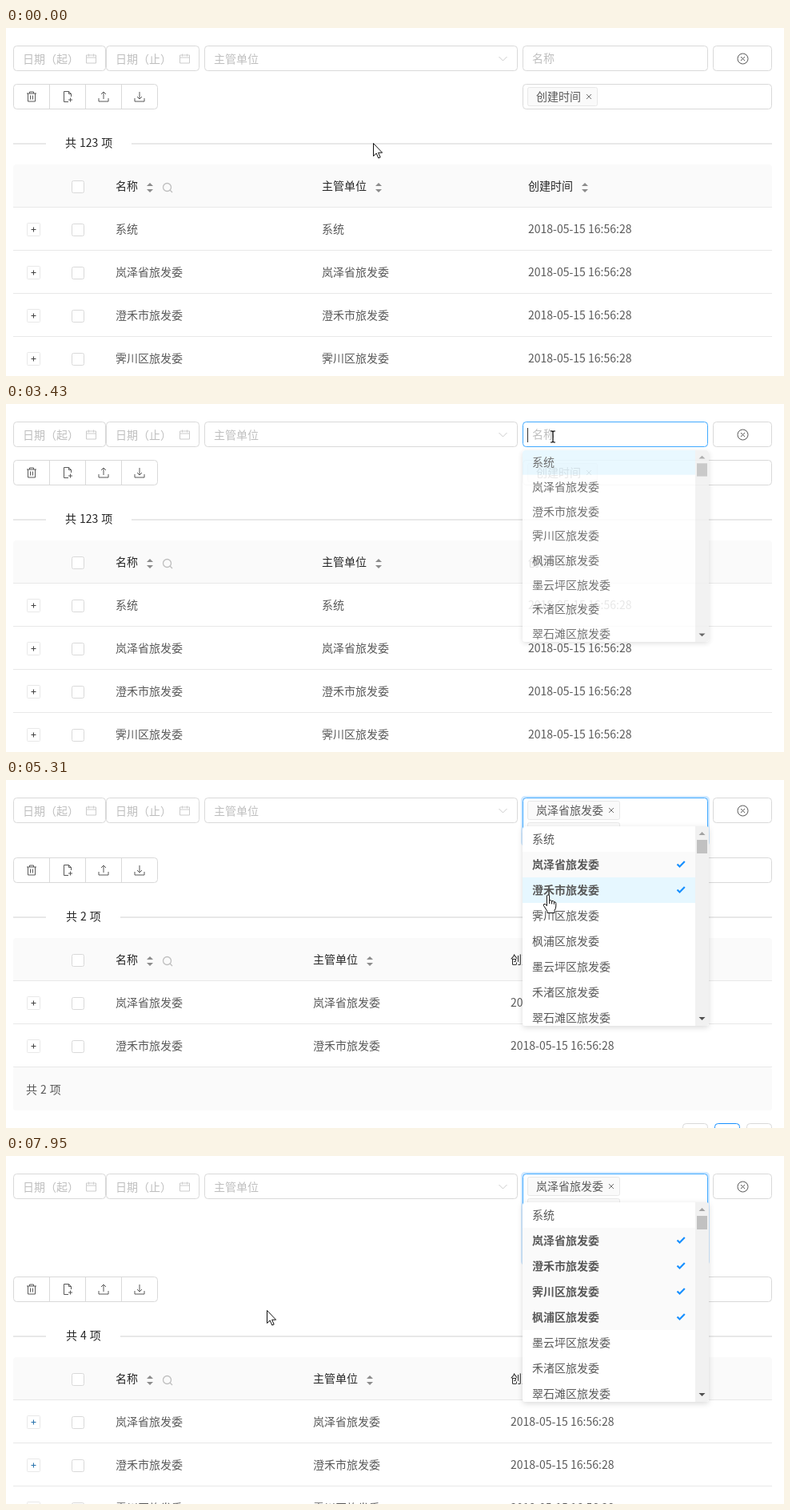
These frames come from a looping animation (973 px wide and 436 px high, 8 s). An HTML page:

```html
<!DOCTYPE html>
<html lang="zh-CN">
<head>
<meta charset="utf-8">
<style>
html, body { margin: 0; width: 100%; height: 100%; overflow: hidden; background: #fff; }
svg { display: block; font: 14px "Noto Sans CJK SC", "Noto Sans CJK", sans-serif; }
text { white-space: pre; }
</style>
</head>
<body>
<svg id="stage" width="973" height="436" viewBox="0 0 973 436"></svg>
<script>
const LOOP = 8000;
const TICK = 110.3; // ms per screen refresh; all times below count ticks
const INK = '#595959', DARK = '#262626', HINT = '#bfbfbf', LINE = '#d9d9d9', RULE = '#e8e8e8',
      PALE = '#fafafa', BLUE = '#1890ff', FOCUS = '#40a9ff', HOVER = '#e6f7ff';
const UNITS = ['系统', '岚泽省旅发委', '澄禾市旅发委', '霁川区旅发委', '枫浦区旅发委',
               '墨云坪区旅发委', '禾渚区旅发委', '翠石滩区旅发委'];
const DATE = '2018-05-15 16:56:28';

const ENTER = 27, TYPE = 29, OPEN = 31, LEAVE = 64;
const PICKS = [39, 46, 53, 61];
const ROW = 54, OPTION = 32, TAG = 27;
const PANEL = { x: 646, y: 58, w: 233, h: 250 };

const MOVES = [
  { from: 3, to: 11, d: 'M459 144C300 132 90 98 20 134' },
  { from: 11, to: 16, d: 'M20 134C8 196 120 200 151 167' },
  { from: 16, to: 19, d: 'M151 167C156 150 140 122 98 119' },
  { from: 19, to: 27, d: 'M98 119C340 110 560 80 684 41' },
  { from: 31, to: 36, d: 'M684 41L677 104' },
  { from: 40, to: 43, d: 'M677 104V135' },
  { from: 47, to: 52, d: 'M677 135L682 180' },
  { from: 54, to: 58, d: 'M682 180L683 200' },
  { from: 63, to: 71, d: 'M683 200C620 200 480 190 392 193' },
  { from: 71, to: 72, d: 'M392 193H326' }
];

const ICON = {
  calendar: 'M-6-4.5H6V5.5H-6ZM-6-1.5H6M-3-6V-3M3-6V-3',
  chevron: 'M-5-2.5L0 2.5L5-2.5',
  trash: 'M-6-4H6M-2.5-4V-6H2.5V-4M-4.5-4V6H4.5V-4M-1.5-1.5V3.5M1.5-1.5V3.5',
  file: 'M1 6.5H-4.5V-6.5H1.5L4.5-3.5V0M1.5-6.5V-3.5H4.5M1 4H6M3.5 1.5V6.5',
  upload: 'M-6 2V6H6V2M0 3V-6M-3-3L0-6L3-3',
  download: 'M-6 2V6H6V2M0-6V3M-3 0L0 3L3 0',
  clear: 'M-6.5 0a6.5 6.5 0 1 0 13 0a6.5 6.5 0 1 0-13 0M-2.5-2.5L2.5 2.5M2.5-2.5L-2.5 2.5',
  search: 'M-5.5-.5a5 5 0 1 0 10 0a5 5 0 1 0-10 0M3 3L6 6',
  cross: 'M-3-3L3 3M3-3L-3 3',
  plus: 'M-3 0H3M0-3V3',
  check: 'M-4.5 .3L-1.5 3.3L4.8-3.3',
  prev: 'M2.5-4.5L-2 0L2.5 4.5',
  next: 'M-2.5-4.5L2 0L-2.5 4.5'
};

const POINTERS = {
  arrow: '<path d="M.5.5V16.5L4.2 13L6.8 19L9.2 18L6.6 12.2H11.6Z" fill="#fff" stroke="#111"/>',
  beam: '<path d="M-3-7H-1L0-6L1-7H3M0-6V6M-3 7H-1L0 6L1 7H3" fill="none" stroke="#000" stroke-width="1.2"/>',
  hand: '<path d="M-1.6.8Q0-1.2 1.6.8V7Q3.3 6 4.6 7.6Q6.4 6.8 7.4 8.6Q9.6 8.4 9.8 10.6V14Q9.8 17 8 19.5V22.5H-1V20.5L-5.6 13.4Q-6 10.8-3.6 11.4L-1.6 13.6Z' +
    'M1.6 7V11M4.6 7.6V11.4M7.4 8.6V11.8" fill="#fff" stroke="#111" stroke-linejoin="round"/>'
};

const rect = (x, y, w, h, fill, r = 0) =>
  `<rect x="${x}" y="${y}" width="${w}" height="${h}" rx="${r}" fill="${fill}"/>`;
const box = (x, y, w, h, stroke = LINE, r = 4, fill = '#fff') =>
  `<rect x="${x + .5}" y="${y + .5}" width="${w - 1}" height="${h - 1}" rx="${r}" fill="${fill}" stroke="${stroke}"/>`;
const text = (s, x, y, fill = INK, attrs = '') => `<text x="${x}" y="${y}" fill="${fill}" ${attrs}>${s}</text>`;
const icon = (name, x, y, color = INK, width = 1) =>
  `<path d="${ICON[name]}" transform="translate(${x} ${y})" fill="none" stroke="${color}" stroke-width="${width}"/>`;
const shape = (d, fill) => `<path d="${d}" fill="${fill}"/>`;
const shift = (y, body) => `<g transform="translate(0 ${y})">${body}</g>`;

const field = (x, w, label, glyph) =>
  box(x, 22, w, 32) + text(label, x + 12, 44, HINT) + icon(glyph, x + w - 18.5, 38.5, '#ccc');
const tag = (label, x, y, w) =>
  box(x, y, w, 24, RULE, 2, PALE) + text(label, x + 11, y + 17) + icon('cross', x + w - 11, y + 12, '#737373');
const checkbox = y => box(82, y, 16, 16, LINE, 2);
const sorter = (x, y) => shape(`M${x - 4} ${y - 2}l4-4l4 4zM${x - 4} ${y + 2}l4 4l4-4z`, '#8c8c8c');

function title() {
  return shape('M17-32h7l12-5v18l-12-5h-1l1 5h-4l-2-5h-1zM37-31q3 0 3 3t-3 3z', '#111') +
    text('旅发委管理', 58, -21, INK, 'font-size="18"');
}

function filters(t, n, extra) {
  let out = field(9, 116, '日期（起）', 'calendar') + field(125, 117, '日期（止）', 'calendar') +
    field(248, 392, '主管单位', 'chevron') + box(884, 22, 74, 32) + icon('clear', 921.5, 38.5);
  if (t > OPEN) out += rect(644, 20, 236, 36 + extra, '#d1e9ff', 5);
  out += box(646, 22, 232, 32 + extra, t >= ENTER ? FOCUS : LINE);
  if (!n) out += text('名称', 658, 43, HINT);
  if (!n && t >= TYPE) out += rect(652, 30, 1, 18, '#333');
  for (let i = 0; i < n; i++) out += tag(UNITS[i + 1], 652, 26 + TAG * i, 116);
  return out;
}

function toolbar() {
  let out = box(9, 70, 181, 32);
  ['trash', 'file', 'upload', 'download'].forEach((name, i) => {
    if (i) out += rect(9 + 45 * i, 70, 1, 32, LINE);
    out += icon(name, 32 + 45 * i, 86);
  });
  return out + box(646, 70, 312, 32) + tag('创建时间', 652, 74, 88);
}

function pager(y) {
  const glyph = [icon('prev', 862, y + 16, HINT), text('1', 902, y + 21, BLUE, 'text-anchor="middle"'),
                 icon('next', 942, y + 16, HINT)];
  return glyph.map((g, i) => box(846 + 40 * i, y, 32, 32, i === 1 ? BLUE : LINE) + g).join('');
}

function table(t, n) {
  const col = i => 137 + (n ? 247 : 258) * i;
  const total = `共 ${n || 123} 项`;
  const plus = n === 1 || t >= LEAVE ? '#2a74ad' : '#444';
  const gapEnd = n ? 143 : 157;
  let out = rect(9, 144, 41, 2, RULE) + rect(gapEnd, 144, 958 - gapEnd, 2, RULE) +
    text(total, n ? 75 : 74, 149, DARK, 'word-spacing=".8"') +
    shape('M9 224V175q0-4 4-4H954q4 0 4 4V224z', PALE) + rect(9, 224, 949, 1, RULE) + checkbox(191);
  ['名称', '主管单位', '创建时间'].forEach((s, i) => {
    out += text(s, col(i), 203, DARK) + sorter(col(i) + 14 * s.length + 15, 200);
  });
  out += icon('search', 202, 200, HINT, 1.3);

  const rows = n || 4;
  for (let i = 0; i < rows; i++) {
    const y = 225 + ROW * i, name = UNITS[n ? i + 1 : i];
    out += box(26, y + 19, 17, 17, RULE, 1) + icon('plus', 34.5, y + 27.5, plus) +
      checkbox(y + 20) + rect(9, y + 53, 949, 1, RULE);
    [name, name, DATE].forEach((s, c) => out += text(s, col(c), y + 32));
  }
  if (!n) return out;

  const end = 225 + ROW * rows;
  return out + rect(9, end, 949, ROW, PALE, 3) +
    text(total, 25, end + 33, INK, 'word-spacing=".8"') + pager(end + 70);
}

function dropdown(t, n, active) {
  const { x, y, w, h } = PANEL;
  let list = '';
  UNITS.forEach((name, i) => {
    const top = y + OPTION * i, picked = i > 0 && i <= n, hot = i === active;
    if (hot || picked) list += rect(x, top, w - 17, OPTION, hot ? HOVER : PALE);
    list += text(name, x + 12, top + 21, INK, picked ? 'font-weight="700"' : '');
    const color = !picked ? '#d9d9d9' : t === PICKS[i - 1] ? '#b4c2c9' : BLUE;
    if (picked || (hot && i)) list += icon('check', 844, top + 47.2 - OPTION, color, 2.2);
  });
  list += rect(862, y, 17, h, '#f1f1f1') + rect(864, 75, 13, 17, '#c1c1c1') +
    shape('M866.5 69l4-4l4 4z', '#a3a3a3') + shape('M866.5 297l4 4l4-4z', '#505050');
  const pose = t === OPEN
    ? `transform="translate(0 ${y}) scale(1 .96) translate(0 ${-y})" opacity=".86"` : '';
  return `<g ${pose}><g filter="url(#shadow)">${rect(x, y, w, h, '#fff', 4)}</g>
    <g clip-path="url(#panel)">${list}</g></g>`;
}

const track = document.createElementNS('http://www.w3.org/2000/svg', 'path');

function pointerAt(t) {
  const move = MOVES.filter(m => m.from <= t).pop() || MOVES[0];
  const k = Math.min(1, Math.max(0, (t - move.from) / (move.to - move.from)));
  track.setAttribute('d', move.d);
  const p = track.getPointAtLength(k * track.getTotalLength());
  const kind = t < ENTER || t > LEAVE ? 'arrow' : t < OPEN + 2 ? 'beam' : 'hand';
  return { x: Math.round(p.x), y: Math.round(p.y), kind };
}

const DEFS = `<defs>
  <filter id="shadow" x="-10%" y="-10%" width="120%" height="120%">
    <feDropShadow dx="0" dy="2" stdDeviation="3.5" flood-color="#000" flood-opacity=".15"/></filter>
  <clipPath id="panel">${rect(PANEL.x, PANEL.y, PANEL.w, PANEL.h, '#000', 4)}</clipPath></defs>`;

function scene(t) {
  const n = PICKS.filter(p => p <= t).length;
  const extra = TAG * Math.max(n - 1, 0);
  const atTop = n === 1; // a single row leaves the page scrolled to its top
  const p = pointerAt(t);
  const active = p.kind === 'hand' ? Math.floor((p.y - PANEL.y) / OPTION) : p.kind === 'beam' ? 0 : -1;
  const page = (atTop ? title() : '') + filters(t, n, extra) + shift(extra, toolbar() + table(t, n));
  return DEFS + shift(atTop ? 69 : 0, page) + (t >= OPEN ? dropdown(t, n, active) : '') +
    `<g transform="translate(${p.x} ${p.y})">${POINTERS[p.kind]}</g>`;
}

const stage = document.getElementById('stage');
const start = performance.now();
let shown = -1;

function play() {
  const tick = Math.floor((performance.now() - start) % LOOP / TICK);
  if (tick !== shown) stage.innerHTML = scene(shown = tick);
  requestAnimationFrame(play);
}
play();
</script>
</body>
</html>
```
